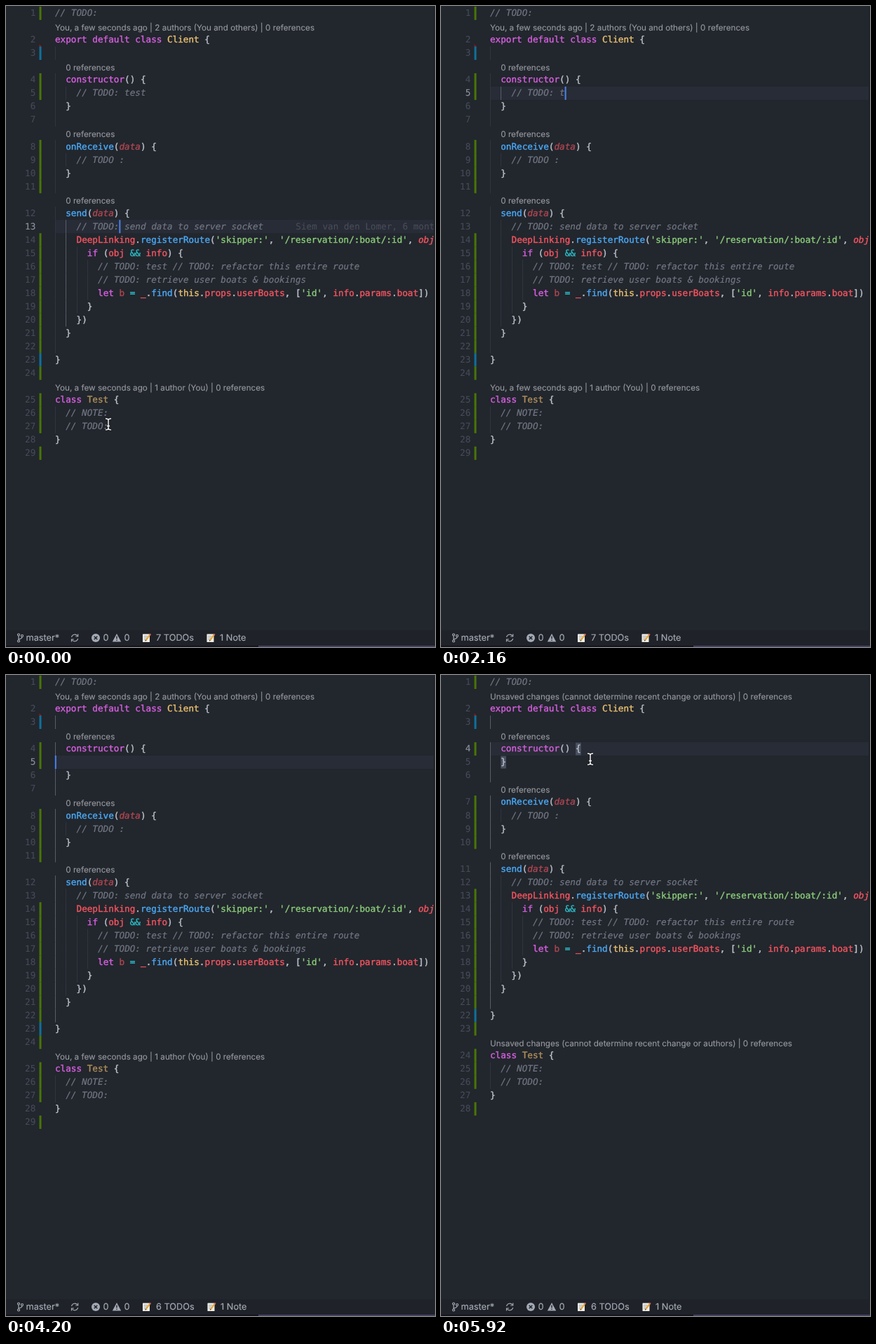
Recreate the animation shown at these times as an HTML page. Size 612 px wide and 915 px high, loop 5960 ms.

```html
<!DOCTYPE html>
<html lang="en">
<head>
<meta charset="utf-8">
<title>Editor</title>
<style>
html, body { margin: 0; width: 100%; height: 100%; overflow: hidden; background: #22262d; }
svg { display: block; width: 612px; height: 915px; }
text { white-space: pre; text-rendering: geometricPrecision; }
.code text { font: 12.67px "DejaVu Sans Mono", "Liberation Mono", monospace; }
.code text, .code tspan { fill: currentColor; stroke: currentColor; stroke-width: .4px; }
.code .lens { font: 11.69px Inter, Roboto, sans-serif; color: #95989e; stroke-width: .15px; }
.code .num { color: #454b57; text-anchor: end; stroke-width: .15px; }
.code .num.on { color: #8d939e; }
.code .blame { color: #484d58; stroke-width: .1px; }
.status text { font: 12.75px Inter, Roboto, sans-serif; fill: #a4aab5; stroke: #a4aab5; stroke-width: .15px; }
.c { color: #717782; font-style: italic; }
.code .c { stroke-width: .2px; }
.p { color: #d55fde; }
.b { color: #4aa9f5; }
.r { color: #f2545f; }
.o { color: #f2545f; font-style: italic; }
.d { color: #ac4650; }
.a { color: #ac4650; font-style: italic; }
.y { color: #e8c06f; }
.t { color: #ac8d5a; }
.g { color: #89ca78; }
.k { color: #2bbac5; }
.w { color: #bcc1ca; }
</style>
</head>
<body>
<svg viewBox="0 0 612 915">
  <defs>
    <clipPath id="view"><rect width="610" height="890"/></clipPath>
    <g id="memo">
      <rect x="0" y="1" width="10" height="11.5" rx=".6" fill="#efeee8"/>
      <path d="M1.5 4H7M1.5 6.3H6M1.5 8.6H5" stroke="#8d98a5" stroke-width=".8"/>
      <path d="M4.5 9.8L10.2 2.2" stroke="#e9a531" stroke-width="2.2"/>
      <path d="M10 2.5L11.2 .9" stroke="#d8646a" stroke-width="2.2"/>
      <path d="M3.8 10.8L4.7 9.6" stroke="#4a3b2c" stroke-width="1.4"/>
    </g>
    <path id="beam" d="M-4 -8Q0 -8 0 -5.5Q0 -8 4 -8M0 -6V6M-4 8Q0 8 0 5.5Q0 8 4 8M-2 2.5H2"/>
  </defs>
  <rect width="612" height="915" fill="#22262d"/>
  <g id="code" class="code" clip-path="url(#view)"></g>
  <rect x="610" width="2" height="915" fill="#1e2127"/>
  <g class="status">
    <rect y="891" width="612" height="22" fill="#1f2228"/>
    <rect y="913" width="360" height="2" fill="#14141d"/>
    <rect x="360" y="913" width="252" height="2" fill="#413f60"/>
    <g fill="none" stroke="#a4aab5" stroke-width="1.2">
      <circle cx="18" cy="897.5" r="1.5"/>
      <circle cx="18" cy="906.5" r="1.5"/>
      <circle cx="23" cy="899" r="1.5"/>
      <path d="M18 899V905M23 900.5Q23 903 18 904"/>
      <path d="M93.6 901A4.6 4.6 0 0 1 102 899.3M102.6 903A4.6 4.6 0 0 1 94.2 904.7"/>
      <path d="M102.7 896.5V900H99.2M93.5 907.5V904H97"/>
    </g>
    <circle cx="128" cy="902" r="6" fill="#a4aab5"/>
    <path d="M125.7 899.7L130.3 904.3M130.3 899.7L125.7 904.3" stroke="#1f2228" stroke-width="1.5"/>
    <path d="M158 896L164.2 907.5H151.8Z" fill="#a4aab5"/>
    <path d="M158 899.5V903.6M158 904.7V906.1" stroke="#1f2228" stroke-width="1.4"/>
    <text x="28.5" y="906.4">master*</text>
    <text x="138.5" y="906.4">0</text>
    <text x="168.5" y="906.4">0</text>
    <use href="#memo" x="195" y="895.5"/>
    <text id="todos" x="214" y="906.4"></text>
    <g id="notes">
      <use href="#memo" x="286.5" y="895.5"/>
      <text x="305" y="906.4">1 Note</text>
    </g>
  </g>
  <g id="mouse" fill="none">
    <use href="#beam" stroke="#14161a" stroke-width="2.8"/>
    <use href="#beam" stroke="#f4f4f4" stroke-width="1.5"/>
  </g>
</svg>
<script>
const LOOP = 5960, LEFT = 70, CHAR = 7.63, ROW = 19.03, TOP = 0.8;
const CLICK = 1080, BLAME = 1280, FIRST_KEY = 1820, KEY_GAP = 135, JOIN = 4420;
const UNSAVED = 4840, RESOLVED = 5200, MOUSE_BACK = 5600;
const TYPED = '// TODO: test';
const $ = id => document.getElementById(id);
const esc = s => s.replace(/&/g, '&amp;').replace(/</g, '&lt;');
const colX = col => LEFT + col * CHAR;

// indent | gutter mark | lens kind | segments, each led by its colour class
const SOURCE = `
0|g||c// TODO:
0||client|pexport default class ¦yClient ¦w{
2|b||
2|g|ref|pconstructor¦w() {
4|g||c${TYPED}
2|||w}
2|||
2|g|late|bonReceive¦w(¦adata¦w) {
4|g||c// TODO :
2|g||w}
2|g||
2||late|bsend¦w(¦adata¦w) {
4|||c// TODO: send data to server socket
4|g||rDeepLinking¦w.¦bregisterRoute¦w(¦g'skipper:'¦w, ¦g'/reservation/:boat/:id'¦w, ¦oobj¦w,
6|g||pif ¦w(¦robj ¦k&& ¦rinfo¦w) {
8|g||c// TODO: test // TODO: refactor this entire route
8|g||c// TODO: retrieve user boats & bookings
8|g||plet ¦db ¦k= ¦r_¦w.¦bfind¦w(¦ythis¦w.¦rprops¦w.¦ruserBoats¦w, [¦g'id'¦w, ¦rinfo¦w.¦rparams¦w.¦rboat¦w])
6|g||w}
4|g||w})
2|g||w}
2|g||
0|b||w}
0|g||
0|g|test|pclass ¦tTest ¦w{
2|g||c// NOTE:
2|g||c// TODO:
0|||w}
0|g||`.slice(1).split('\n').map((row, i) => {
  const [indent, mark, lens, code] = row.split('|');
  return { id: i + 1, indent: +indent, mark, lens, segments: code ? code.split('¦') : [] };
});

function lensText(kind, s) {
  const refs = '0 references';
  const unsaved = 'Unsaved changes (cannot determine recent change or authors)';
  if (kind === 'ref') return refs;
  if (kind === 'late') return s.joined && !s.resolved ? '' : refs;
  if (kind === 'client')
    return (s.unsaved ? unsaved : 'You, a few seconds ago | 2 authors (You and others)') + ' | ' + refs;
  if (s.unsaved) return s.resolved ? unsaved + ' | ' + refs : unsaved;
  return 'You, a few seconds ago | 1 author (You) | ' + refs;
}

function stateAt(t) {
  const keys = t < FIRST_KEY ? 0 : Math.min(15, 1 + Math.floor((t - FIRST_KEY) / KEY_GAP));
  const joined = t >= JOIN;
  const lastInput = joined ? JOIN : keys ? FIRST_KEY + (keys - 1) * KEY_GAP : t >= CLICK ? CLICK : 0;
  return {
    keys, joined,
    line: joined ? 4 : t >= CLICK ? 5 : 13,
    caret: Math.floor((t - lastInput) / 500) % 2 === 0,
    blame: t < CLICK || (t >= BLAME && t < FIRST_KEY),
    unsaved: t >= UNSAVED,
    resolved: t >= RESOLVED
  };
}

function activeGuide(s, editIndent) {
  if (s.line === 13) return { level: 1, from: 13, to: 20 };
  if (s.line === 5 && editIndent === 4) return { level: 1, from: 5, to: 5 };
  return { level: 0, from: 3, to: 22 };
}

const rect = (x, y, w, h, fill) => `<rect x="${x}" y="${y}" width="${w}" height="${h}" fill="${fill}"/>`;
const label = (cls, x, y, s) => `<text class="${cls}" x="${x}" y="${y}">${s}</text>`;

function drawCode(s) {
  const editIndent = Math.max(0, 4 - 2 * Math.max(0, s.keys - 13));
  const guide = activeGuide(s, editIndent);
  let out = '', row = 0, number = 0;

  for (const line of SOURCE) {
    const editing = line.id === 5;
    if (editing && s.joined) continue;
    if (line.lens) {
      out += label('lens', colX(line.indent), TOP + row * ROW + 15.2, lensText(line.lens, s));
      row++;
    }
    const y = TOP + row * ROW, base = y + 13.4, active = line.id === s.line;
    const indent = editing ? editIndent : line.indent;
    const segments = editing ? ['c' + TYPED.slice(0, Math.max(0, TYPED.length - s.keys))] : line.segments;
    const end = indent + segments.reduce((n, part) => n + part.length - 1, 0);

    if (active) out += rect(LEFT, y, 540, ROW, '#282c36');
    out += label(active ? 'num on' : 'num', 42.3, base, ++number);
    if (line.mark) out += rect(47.5, y, 3, ROW + .1, line.mark === 'g' ? '#487505' : '#0f719a');
    if (line.id === 2) out += `<path d="M47.5 ${y + 15.5}L51 ${y + ROW}H47.5Z" fill="#94151b"/>`;

    const depth = Math.max(indent / 2, editing ? 1 : 0);
    for (let level = 0; level < depth; level++) {
      const lit = level === guide.level && line.id >= guide.from && line.id <= guide.to;
      out += rect(Math.round(colX(level * 2)), y, 1, ROW + .1, lit ? '#585d67' : '#31353d');
    }
    if (s.joined && (line.id === 4 || line.id === 6))
      out += rect(colX(end - 1), y + .7, CHAR, ROW - 1.2, '#495160');

    const spans = segments.map(part => `<tspan class="${part[0]}">${esc(part.slice(1))}</tspan>`);
    out += label('', colX(indent), base, spans.join(''));

    if (active && s.blame) {
      const note = line.id === 13 ? 'Siem van den Lomer, 6 months ago' : 'You, a few seconds ago • Uncommitted changes';
      out += label('blame', colX(end + 6), base, note);
    }
    if (active && s.caret) {
      const col = line.id === 13 ? indent + 8 : end;
      out += rect(colX(col) - .2, y, 2, ROW, '#4a82ee');
    }
    row++;
  }
  $('code').innerHTML = out;
  const fewer = s.keys >= 6;
  $('todos').textContent = (fewer ? 6 : 7) + ' TODOs';
  $('notes').setAttribute('transform', `translate(${fewer ? 1 : 0} 0)`);
}

function glide(t, start, end) {
  const u = Math.min(1, Math.max(0, (t - start) / (end - start)));
  return u * u * (3 - 2 * u);
}

function drawMouse(t) {
  const up = glide(t, 40, 540), right = glide(t, 640, 1000);
  const x = 146 + 16.5 * up + 50.5 * right;
  const y = t >= MOUSE_BACK ? 120 : 597 - 477 * up + 9 * right;
  $('mouse').setAttribute('transform', `translate(${x} ${y})`);
  $('mouse').style.display = t >= FIRST_KEY && t < MOUSE_BACK ? 'none' : '';
}

let shown = '';
function render(t) {
  const state = stateAt(t), key = JSON.stringify(state);
  if (key !== shown) {
    drawCode(state);
    shown = key;
  }
  drawMouse(t);
}

const began = performance.now();
function tick() {
  render((performance.now() - began) % LOOP);
  requestAnimationFrame(tick);
}
tick();
</script>
</body>
</html>
```
